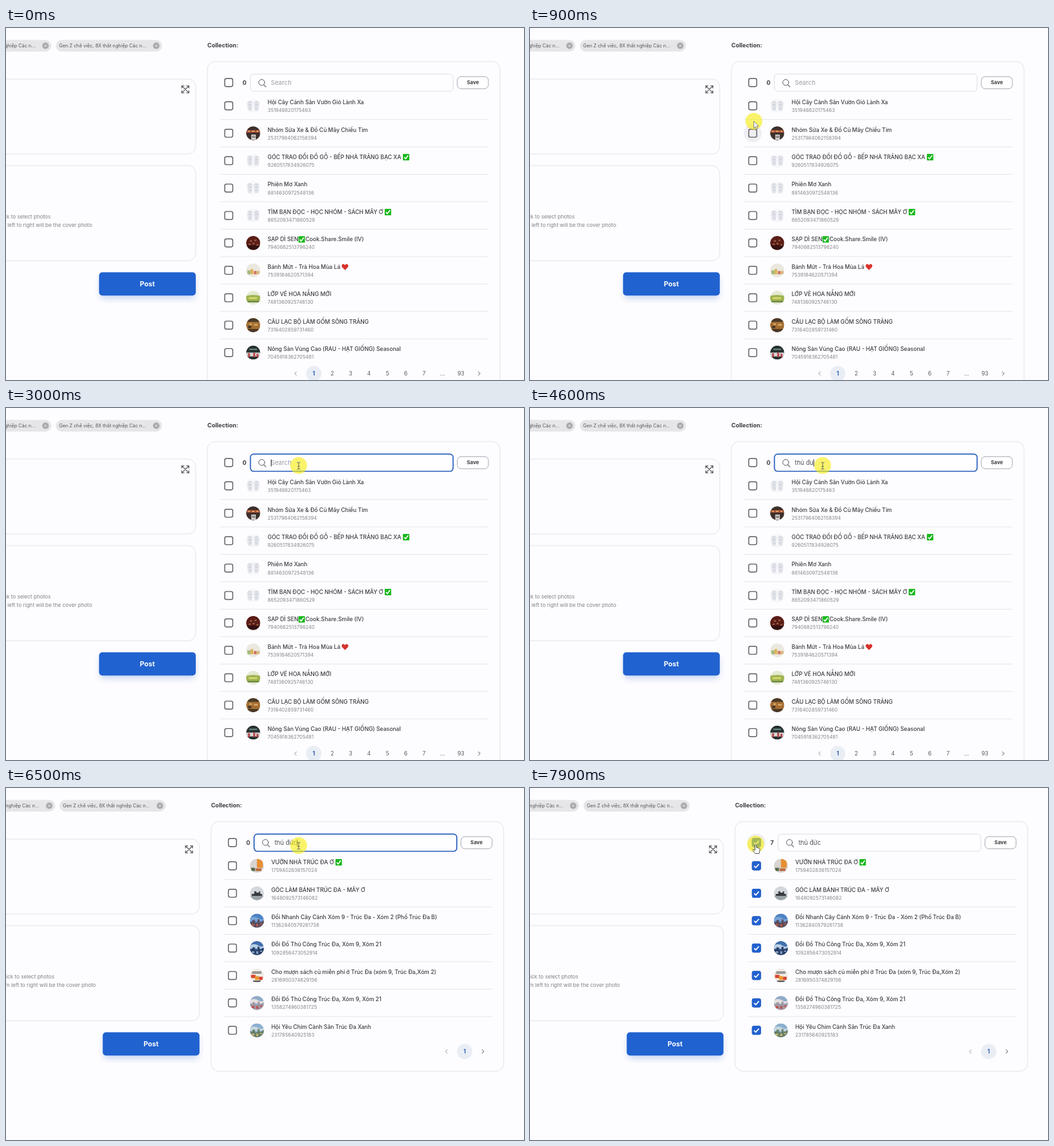
Animation of 800x545 px, one loop 8 s. Source, as an HTML page:

```html
<!DOCTYPE html>
<html lang="vi">
<head>
<meta charset="utf-8">
<title>Collection search</title>
<style>
html, body { margin: 0; height: 100%; overflow: hidden; background: #fdfcfe; }
svg { display: block; width: 800px; height: 545px; }
text { font-family: Inter, Roboto, sans-serif; white-space: pre; fill: #3c3c42; }
.mid { text-anchor: middle; }
.end { text-anchor: end; }
.title { font-size: 8.6px; font-weight: 500; }
.id { font-size: 7.6px; fill: #86868c; }
.chip { font-size: 7.3px; fill: #55555a; }
.note { font-size: 8.1px; fill: #808086; }
.page { font-size: 8.6px; fill: #5c5c62; }
.query { font-size: 9.6px; }
.bold { font-weight: 700; }
.line { fill: none; stroke: #5c5c63; stroke-linecap: round; stroke-linejoin: round; }
.card { fill: none; stroke: #e3e3ea; }
</style>
</head>
<body>
<svg viewBox="0 0 800 545">
  <defs>
    <clipPath id="round"><circle r="10.8"/></clipPath>
    <filter id="soft" x="-20%" y="-50%" width="140%" height="220%"><feGaussianBlur stdDeviation="5"/></filter>
  </defs>
  <g id="page"></g>
  <g id="cursor">
    <circle r="13" fill="#f5ee10" fill-opacity=".62"/>
    <path id="arrow" d="M0 0V10.5L2.5 8.3L4.2 12L5.9 11.2L4.3 7.6H7.4Z" fill="#fff" stroke="#666" stroke-width=".8"/>
    <path id="beam" d="M-2.2 -5Q0 -5 0 -3.5V4.5Q0 6 -2.2 6M2.2 -5Q0 -5 0 -3.5M0 4.5Q0 6 2.2 6M-1.2 1.5H1.2" class="line" stroke-width=".9"/>
    <path id="hand" d="M-1 8V1.2Q0 -.4 1.2 1.2V5.2L5.5 6.2Q6.8 6.8 6.5 9L5.4 14.5H-.6L-4.2 9.5Q-4.4 7.6 -2.6 8.2L-1 9.6Z" fill="#fff" stroke="#444" stroke-width=".9"/>
  </g>
</svg>
<script>
const LOOP = 8000, SHIFT = 5.7, ROW = 42.45, ROW_TOP = 120.5;
const FOCUS = 2100, RESULTS = 5600, CHECK = 7600;
const $ = id => document.getElementById(id);
const page = $('page');

function add(parent, tag, attrs, content) {
  const el = document.createElementNS('http://www.w3.org/2000/svg', tag);
  for (const name in attrs) el.setAttribute(name, attrs[name]);
  if (content !== undefined) el.textContent = content;
  return parent.appendChild(el);
}
const text = (parent, x, y, cls, content) => add(parent, 'text', { x, y, class: cls }, content);
const rect = (parent, x, y, width, height, rx, attrs) => add(parent, 'rect', { x, y, width, height, rx, ...attrs });
const path = (parent, d, attrs) => add(parent, 'path', { d, ...attrs });
const group = (parent, x = 0, y = 0) => add(parent, 'g', { transform: `translate(${x} ${y})` });
const show = (el, on) => { el.style.display = on ? '' : 'none'; };

// Left column
for (const x of [-94, 77]) {
  rect(page, x, 18.5, 164, 18, 9, { fill: '#e6e6e9' });
  text(page, x + 5, 30, 'chip', 'Gen Z chê việc, 8X thất nghiệp Các n...');
  add(page, 'circle', { cx: x + 155, cy: 27.5, r: 5, fill: '#a9a9ae' });
  path(page, `M${x + 153.4} 25.9l3.2 3.2m0 -3.2l-3.2 3.2`, { stroke: '#eee', 'stroke-width': 1 });
}
rect(page, -60, 79, 353, 116, 12, { class: 'card' });
rect(page, -60, 213, 353, 147.5, 12, { class: 'card' });
path(page, 'M271.5 89.5l11 11m0 -11l-11 11M271.5 93v-3.5h3.5M279 89.5h3.5v3.5M282.5 97v3.5h-3.5M275 100.5h-3.5v-3.5',
  { class: 'line', 'stroke-width': 1.2 });
text(page, 69, 295, 'note end', 'Click to select photos');
text(page, 133, 308.3, 'note end', 'The first photo from left to right will be the cover photo');
rect(page, 145, 384, 147, 35, 6, { fill: '#2062d0', opacity: .24, filter: 'url(#soft)' });
rect(page, 143.7, 378.2, 149.4, 36, 5, { fill: '#2062d0' });
text(page, 218.3, 400.1, 'mid bold', 'Post').style.cssText = 'fill:#fff;font-size:10.6px';

// Collection header
text(page, 311, 29.7, 'bold', 'Collection:').style.fontSize = '9px';
const panel = rect(page, 311, 52, 452, 520, 12, { class: 'card' });
const count = text(page, 368.3, 87.8, 'mid bold', '0');
count.style.fontSize = '9px';
const field = rect(page, 377.5, 71.3, 313, 26.7, 5, { fill: '#fefdff' });
path(page, 'M398.4 88.2l3 3', { class: 'line', 'stroke-width': 1.1 });
add(page, 'circle', { cx: 395, cy: 84.3, r: 4.6, class: 'line' });
const query = text(page, 409, 88.4, 'query', '');
const caret = rect(page, 0, 79.5, 1, 11, 0, { fill: '#333' });
rect(page, 697, 75.3, 48, 18.7, 6, { fill: '#fff', stroke: '#a6aab3' });
text(page, 721, 87, 'mid bold', 'Save').style.fontSize = '7.8px';

// Checkboxes
const boxes = [];
function checkbox(parent, y) {
  const g = group(parent, 344, y);
  const halo = add(g, 'circle', { r: 14, fill: '#333a55', opacity: 0 });
  rect(g, -6.2, -6.2, 12.4, 12.4, 2.6, { class: 'line', 'stroke-width': 1.4 });
  const mark = group(g);
  rect(mark, -7, -7, 14, 14, 3, { fill: '#2161d0' });
  path(mark, 'M-3.6 .2L-1 2.8L3.8 -2.6', { fill: 'none', stroke: '#fff', 'stroke-width': 1.7 });
  boxes.push({ parent, y, halo, mark });
}
checkbox(page, 84.5);

// Each picture: a base colour, then colour and path pairs inside a circle
const slippers = ['#f8f8fb',
  '#e2e4ea', 'M-9.5 -6Q-5 -10 -1 -6L-2 7Q-5 9 -8 7ZM1 -6Q5 -10 9.5 -6L8 7Q5 9 2 7Z',
  '#bfc3cd', 'M-6 -6h2v1h-2zM4 -6h2v1h-2zM-7 -2h4v1h-4zM3 -2h4v1h-4zM-6 3h3v1h-3zM3 3h3v1h-3z'];
const skyline = (sky, cloud, city, accent) => [sky, cloud, 'M-11 -4Q-4 -8 2 -4T11 -5V1H-11Z',
  city, 'M-11 11V2h4v-3h4v4h4v-5h3v4h4v-2h4v11Z', accent, 'M-8 5h4v3h-4zM-1 5h3v4h-3zM5 4h3v2h-3z'];

const groups = [
  ['Hội Cây Cảnh Sân Vườn Gió Lành Xa', '351946820175463', slippers],
  ['Nhóm Sửa Xe & Đồ Cũ Mây Chiều Tím', '25317984062158394', ['#3d302c', '#a8503a', 'M-10 -5h20v4h-20z', '#dba05c', 'M-8 -4h3v2h-3zM-2 -4h4v2h-4zM5 -4h3v2h-3z', '#d8d4d2', 'M-3 2h7v8h-7z', '#555', 'M-2 4h5v1h-5zM-2 6h5v1h-5z']],
  ['GÓC TRAO ĐỔI ĐỒ GỖ - BẾP NHÀ TRĂNG BẠC XA ✅', '9260517834926075', slippers],
  ['Phiên Mơ Xanh', '8814630972548136', slippers],
  ['TÌM BẠN ĐỌC - HỌC NHÓM - SÁCH MÂY Ơ ✅', '8652093471860529', slippers],
  ['SẠP DÌ SEN✅Cook.Share.Smile (IV)', '7940682513796240', ['#5c1d17', '#321110', 'M-11 4h22v8h-22z', '#a0694a', 'M-5 -4h3v2h-3zM2 -5h3v2h-3zM-7 1h3v2h-3zM-1 0h3v2h-3zM5 2h3v2h-3z']],
  ['Bánh Mứt - Trà Hoa Mùa Lá ❤', '7539184620571394', ['#ebe8df', '#a5b97c', 'M-9 0h5v6h-5z', '#dcb458', 'M-4 -2h4v8h-4z', '#d0705a', 'M1 1h4v5h-4z', '#d9b984', 'M5 1h5v5h-5z']],
  ['LỚP VẼ HOA NẮNG MỚI', '7481360925746130', ['#e4e9d2', '#9db350', 'M-11 -3Q0 -6 11 -3V6H-11Z', '#d5d670', 'M-7 -1h13v3h-13z', '#647f3c', 'M-10 5h20v2h-20z']],
  ['CÂU LẠC BỘ LÀM GỐM SÔNG TRĂNG', '7316402859731460', ['#a46d31', '#4a3a28', 'M-11 -11h22v6h-22zM-8 1h5v4h-5z', '#d0a160', 'M-6 -3h4v3h-4zM1 -2h6v3h-6z', '#4b3826', 'M-11 6h22v6h-22z']],
  ['Nông Sản Vùng Cao (RAU - HẠT GIỐNG) Seasonal', '7045918362705481', ['#25302f', '#d9d6d6', 'M-11 0h22v6h-22z', '#b9484c', 'M-8 1h3v6h-3zM0 0h3v7h-3zM5 2h3v5h-3z', '#6f918b', 'M-6 -6h12v2h-12z']]
];
const results = [
  ['VƯỜN NHÀ TRÚC ĐA Ơ ✅', '1759402836157024', ['#d9d5d2', '#e78f33', 'M0 -11h9v14h-9z', '#55694a', 'M-9 3h6v5h-6z', '#b8683d', 'M-2 4h9v4h-9z']],
  ['GÓC LÀM BÁNH TRÚC ĐA - MÂY Ơ', '1648092573146082', ['#d4d8dc', '#9aa2a8', 'M-11 4h22v8h-22z', '#353a40', 'M-8 4V1h4v-4h3v2h4v-2h2v4h3v3z']],
  ['Đổi Nhanh Cây Cảnh Xóm 9 - Trúc Đa - Xóm 2 (Phố Trúc Đa B)', '11362840579261738', skyline('#4d83c5', '#7aa4d6', '#584b5d', '#b65f4a')],
  ['Đổi Đồ Thủ Công Trúc Đa, Xóm 9, Xóm 21', '1092856473052914', skyline('#416fae', '#b9cfe6', '#273d64', '#8fa9c9')],
  ['Cho mượn sách cũ miễn phí ở Trúc Đa (xóm 9, Trúc Đa,Xóm 2)', '2816950374829156', ['#f0ece6', '#d8432f', 'M-9 -1h7v5h-7zM3 2h6v5h-6z', '#e99a2f', 'M-3 1h6v6h-6z', '#444', 'M-7 -6h14v1h-14zM-8 -4h15v1h-15zM-6 8h12v2h-12z']],
  ['Đổi Đồ Thủ Công Trúc Đa, Xóm 9, Xóm 21', '1358274960381725', skyline('#91abc9', '#e4e0e2', '#a1969f', '#c4484a')],
  ['Hội Yêu Chim Cảnh Sân Trúc Đa Xanh', '231785640925183', skyline('#8bb0d0', '#c6d7df', '#667d67', '#c7b878')]
];

// Text with the two small pictograms set inline
function title(parent, y, content) {
  let x = 404;
  for (const part of content.split(/([✅❤])/)) {
    if (part === '✅') {
      const g = group(parent, x + 5.2, y - 3);
      rect(g, -5, -5, 10, 10, 1, { fill: '#18b81c' });
      path(g, 'M-3 .2L-.9 2.6L3.2 -2.8', { fill: 'none', stroke: '#fff', 'stroke-width': 1.6 });
      x += 11;
    } else if (part === '❤') {
      path(group(parent, x + 5, y - 3), 'M0 5L-4.3 .6C-7 -3 -2.3 -6.5 0 -2.6C2.3 -6.5 7 -3 4.3 .6Z', { fill: '#d6322c' });
    } else if (part) {
      x += text(parent, x, y, 'title', part).getComputedTextLength();
    }
  }
}

function list(rows, pages, pageY) {
  const g = group(page);
  rows.forEach(([name, id, [base, ...shapes]], i) => {
    const y = ROW_TOP + i * ROW;
    checkbox(g, y);
    const photo = add(group(g, 381.8, y), 'g', { 'clip-path': 'url(#round)' });
    add(photo, 'circle', { r: 11, fill: base });
    for (let k = 0; k < shapes.length; k += 2) path(photo, shapes[k + 1], { fill: shapes[k] });
    title(g, y - 2.4, name);
    text(g, 404, y + 9.7, 'id', id);
    if (i < rows.length - 1) path(g, `M331 ${y + 21.2}H745`, { stroke: '#e6e6eb' });
  });
  const firstX = 731 - (pages.length + 1) * 28.4;
  add(g, 'circle', { cx: firstX + 28.4, cy: pageY, r: 11.8, fill: '#e9edf4' });
  pages.forEach((label, i) => {
    const el = text(g, firstX + (i + 1) * 28.4, pageY + 3.1, 'page mid', label);
    if (!i) el.style.cssText = 'fill:#2a5fb8;font-weight:700';
  });
  path(g, `M${firstX + 1.5} ${pageY - 2.8}l-2.8 2.8l2.8 2.8`, { class: 'line', opacity: .65 });
  path(g, `M729.5 ${pageY - 2.8}l2.8 2.8l-2.8 2.8`, { class: 'line' });
  return g;
}
const before = list(groups, ['1', '2', '3', '4', '5', '6', '7', '...', '93'], 535);
const after = list(results, ['1'], 408);

const typing = [[3900, 't'], [4000, 'th'], [4100, 'thu'], [4200, 'thủ'], [4300, 'thủ '], [4500, 'thủ đ'],
  [4600, 'thủ đu'], [4900, 'thủ đư'], [5000, 'thủ đưc'], [5300, 'thủ đức']];
const moves = [[100, 950, 320, 600, 346, 140], [1000, 1500, 346, 140, 452, 89], [7100, 7500, 452, 89, 348.5, 87]];

function pointer(t) {
  const [start, end, x0, y0, x1, y1] = moves.findLast(m => t >= m[0]) || moves[0];
  const u = Math.min(1, Math.max(0, (t - start) / (end - start)));
  const s = u * u * (3 - 2 * u);
  return [x0 + (x1 - x0) * s, y0 + (y1 - y0) * s];
}

function render(t) {
  const found = t >= RESULTS, checked = t >= CHECK;
  const focused = t >= FOCUS && !checked;
  const dx = found ? SHIFT : 0;
  const [x, y] = pointer(t);
  const overField = x > 377 + dx && y > 71 && y < 98;

  page.setAttribute('transform', `translate(${dx} 0)`);
  show(before, !found);
  show(after, found);
  panel.setAttribute('height', found ? 386.5 : 520);
  count.textContent = checked ? 7 : 0;
  field.setAttribute('stroke', focused ? '#2a60bd' : overField ? '#6b6b72' : '#dfdfe5');
  field.setAttribute('stroke-width', focused ? 1.7 : 1);

  const typed = typing.findLast(k => t >= k[0]);
  query.textContent = typed ? typed[1] : 'Search';
  query.style.fill = typed ? '#505056' : '#9c9ca2';
  caret.setAttribute('x', 409 + (typed ? query.getComputedTextLength() : 0));
  const blinkStart = !typed ? 1900 : t < 5400 ? typed[0] : 5400;
  show(caret, focused && (t - blinkStart) % 1000 < 500);

  const [lagX, lagY] = pointer(t - 60);
  let overBox = false;
  for (const box of boxes) {
    const live = box.parent === page || box.parent === (found ? after : before);
    const near = (px, py) => live && Math.hypot(px - 344 - dx, py - box.y) < 15;
    overBox ||= near(x, y);
    box.halo.setAttribute('opacity', near(lagX, lagY) ? .07 : 0);
    show(box.mark, checked);
  }

  $('cursor').setAttribute('transform', `translate(${x} ${y})`);
  show($('beam'), overField);
  show($('hand'), overBox);
  show($('arrow'), !overField && !overBox);
}

function tick() {
  render(performance.now() % LOOP);
  requestAnimationFrame(tick);
}
tick();
</script>
</body>
</html>
```
